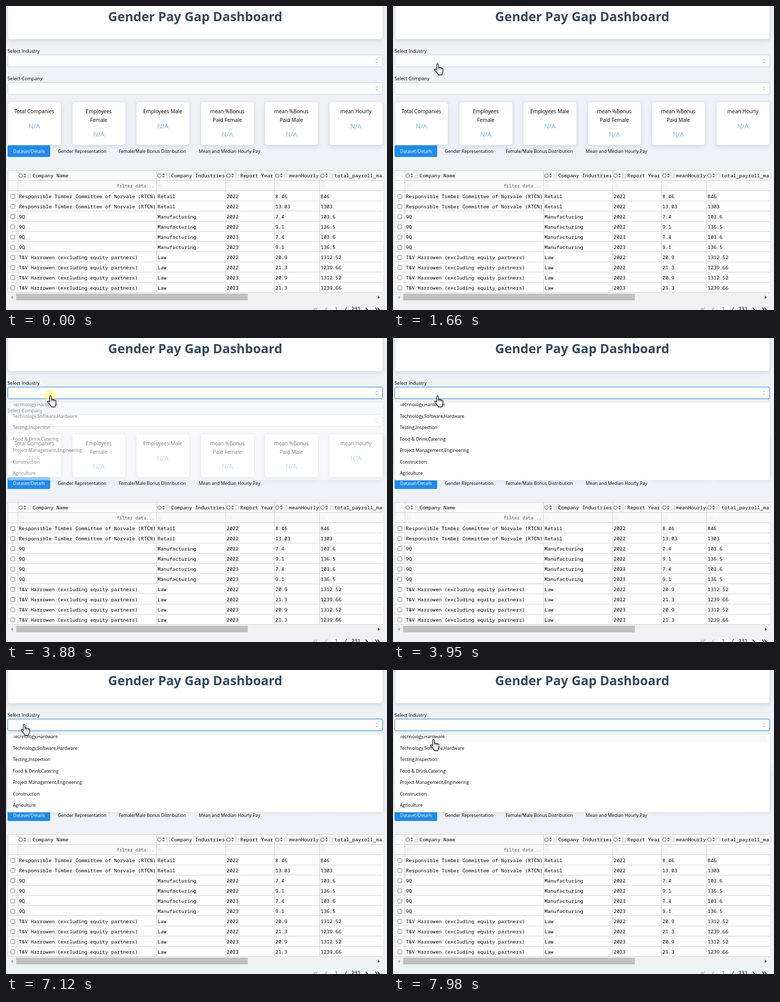
An HTML page that plays this animation: 750 by 598 pixels, repeating every 8 s.

```html
<!DOCTYPE html>
<html lang="en">
<head>
<meta charset="utf-8">
<title>Gender Pay Gap Dashboard</title>
<style>
  html, body { margin: 0; width: 100%; height: 100%; overflow: hidden; background: #eef2f6; }
  svg { display: block; width: 750px; height: 598px; }
  text { font-family: "Open Sans", "Noto Sans", sans-serif; white-space: pre; }
  .mono { font-family: "Noto Sans Mono", "DejaVu Sans Mono", monospace; }
  .card { fill: #fff; stroke: #dee2e6; filter: drop-shadow(0 3px 4px rgba(40, 60, 90, .12)); }
  .menu { fill: #fff; stroke: #f1f3f5; filter: drop-shadow(0 2px 4px rgba(40, 60, 90, .05)); }
</style>
</head>
<body>
<svg id="stage" viewBox="0 0 750 598"></svg>
<script>
const LOOP = 8000;
const stage = document.getElementById('stage');

function add(parent, tag, attrs, content) {
  const el = document.createElementNS('http://www.w3.org/2000/svg', tag);
  for (const k in attrs) el.setAttribute(k, attrs[k]);
  if (content !== undefined) el.textContent = content;
  parent.appendChild(el);
  return el;
}
const group = (parent = stage, attrs = {}) => add(parent, 'g', attrs);
const rect = (p, x, y, width, height, fill, more = {}) =>
  add(p, 'rect', { x, y, width, height, fill, ...more });
const path = (p, d, stroke, more = {}) => add(p, 'path', { d, stroke, fill: 'none', ...more });
const label = (p, x, y, str, size, more = {}) =>
  add(p, 'text', { x, y, 'font-size': size, fill: '#000', ...more }, str);
const mono = (p, x, y, str, size = 9.77, more = {}) =>
  label(p, x, y, str, size, { class: 'mono', ...more });

function card(x, y, w, h) {
  add(stage, 'rect', { x: x + .5, y: y + .5, width: w - 1, height: h - 1, rx: 5, class: 'card' });
}

function select(title, y) {
  label(stage, 3, y - 4, title, 9.2);
  const box = rect(stage, 3.5, y + .5, 738, 23, '#fff', { rx: 2.5, stroke: '#ced4da' });
  path(stage, `M728 ${y + 10.5}l2-2.3l2 2.3M728 ${y + 13.5}l2 2.3l2-2.3`, '#868e96', { 'stroke-width': .9 });
  return box;
}

function drawTop() {
  card(3, -20, 739, 86);
  label(stage, 372.5, 30, 'Gender Pay Gap Dashboard', 25.2,
    { 'font-weight': 700, 'text-anchor': 'middle', fill: '#34495e' });
}

function drawCards() {
  const titles = [['Total Companies'], ['Employees', 'Female'], ['Employees Male'],
    ['mean %Bonus', 'Paid Female'], ['mean %Bonus', 'Paid Male'], ['mean Hourly']];
  titles.forEach((lines, i) => {
    const x = Math.round(3 + i * 126.6), mid = x + 52.7;
    card(x, 188, 106, 86);
    lines.forEach((s, j) => label(stage, mid, 211 + 17 * j, s, 10.15, { 'text-anchor': 'middle' }));
    label(stage, mid, 224 + 16.5 * lines.length, 'N/A', 13.6,
      { 'text-anchor': 'middle', fill: '#3498db', 'font-weight': 300 });
  });
}

function drawTabs() {
  rect(stage, 3, 274, 84, 23, '#228be6', { rx: 2.5 });
  label(stage, 14, 289, 'Dataset/Details', 8.8, { fill: '#fff' });
  label(stage, 102, 289, 'Gender Representation', 8.8);
  label(stage, 222, 289, 'Female/Male Bonus Distribution', 8.8);
  label(stage, 379.5, 289, 'Mean and Median Hourly Pay', 8.8);
}

function headIcons(x) {
  add(stage, 'circle', { cx: x + 6, cy: 333.5, r: 3.6, fill: 'none', stroke: '#555', 'stroke-width': .9 });
  path(stage, `M${x + 11} 332.6h6l-3-3.6zM${x + 11} 334.4h6l-3 3.6z`, 'none', { fill: '#777' });
  path(stage, `M${x + 19.5} 330.5h7M${x + 22} 329.5h2M${x + 20.5} 331v7h5v-7M${x + 23} 332v5`, '#d6d2d2');
  path(stage, `M${x + 4} 350.5h8M${x + 4} 353.5h8M${x + 5} 350v7h6v-7`, '#f3ecec');
}

function drawTable() {
  const cols = [[23, 'Company Name'], [296, 'Company Industries'], [432, 'Report Year'],
    [528, 'meanHourly'], [617, 'total_payroll_ma']];
  const energy = ['Responsible Timber Committee of Norvale (RTCN)', 'Retail'];
  const maker = ['9Q', 'Manufacturing'];
  const law = ['T&V Harrowen (excluding equity partners)', 'Law'];
  const rows = [
    [...energy, 2022, '8.46', '846'], [...energy, 2022, '13.03', '1303'],
    [...maker, 2022, '7.4', '103.6'], [...maker, 2022, '9.1', '136.5'],
    [...maker, 2023, '7.4', '103.6'], [...maker, 2023, '9.1', '136.5'],
    [...law, 2022, '20.9', '1312.52'], [...law, 2022, '21.3', '1239.66'],
    [...law, 2023, '20.9', '1312.52'], [...law, 2023, '21.3', '1239.66']];

  rect(stage, 3, 323, 739, 41, '#fafafa');
  rect(stage, 3, 364, 739, 200, '#fff');
  let grid = '';
  for (let y = 323.5; y < 565; y += 20) grid += `M3 ${y}H742`;
  for (const x of [3, ...cols.map(c => c[0])]) grid += `M${x + .5} 323V564`;
  path(stage, grid, '#d3d3d3');

  for (const [x, name] of cols) {
    headIcons(x);
    mono(stage, x + 29.3, 337, name);
  }
  mono(stage, 217.8, 357, 'filter data...', 8.85, { fill: '#5c5457' });

  rows.forEach((row, i) => {
    const y = 378 + 20 * i;
    rect(stage, 9.5, y - 7.5, 8, 8, '#fff', { rx: 1.5, stroke: '#767676', 'stroke-width': .9 });
    row.forEach((v, j) => mono(stage, cols[j][0] + 2.3, y, v));
  });

  rect(stage, 3, 564, 739, 17, '#f1f1f1');
  rect(stage, 20, 566, 456, 13, '#c1c1c1');
  path(stage, 'M13.5 569.5v7l-4-3.5z', 'none', { fill: '#a3a3a3' });
  path(stage, 'M732 569.5v7l4-3.5z', 'none', { fill: '#505050' });
}

function drawPager() {
  const left = x => `M${x} 593.5l-3.5 3.5l3.5 3.5`;
  const right = x => `M${x} 593.5l3.5 3.5l-3.5 3.5`;
  path(stage, left(609.5) + left(613.5) + left(632), '#a5a8ab', { 'stroke-width': 1.3 });
  path(stage, right(708) + right(727) + right(731), '#222', { 'stroke-width': 1.5 });
  rect(stage, 640, 589, 20, 9, '#fff');
  mono(stage, 647, 600, '1', 10, { fill: '#1f5f9a' });
  mono(stage, 666, 600, '/', 10);
  mono(stage, 680, 600, '231', 10);
}

function drawMenu() {
  const g = group();
  add(g, 'rect', { x: 3.5, y: 126.5, width: 738, height: 153, rx: 2.5, class: 'menu' });
  const clip = add(stage, 'clipPath', { id: 'list' });
  rect(clip, 4, 129, 737, 147, '#000');
  const list = group(g, { 'clip-path': 'url(#list)' });
  const hover = rect(list, 9, 120, 727, 22, '#f8f9fa', { rx: 2.5 });
  ['Technology,Hardware', 'Technology,Software,Hardware', 'Testing,Inspection', 'Food & Drink,Catering',
    'Project Management,Engineering', 'Construction', 'Agriculture']
    .forEach((s, i) => label(list, 13.5, 134.2 + 22.5 * i, s, 8.8));
  return { g, hover };
}

drawTop();
const industry = select('Select Industry', 96);
select('Select Company', 150);
drawCards();
drawTabs();
drawTable();
drawPager();
const menu = drawMenu();
const halo = add(stage, 'circle', { cx: 87.5, cy: 114, r: 12.3, fill: '#ffff3c' });

const cursor = group();
const pointers = { arrow: group(cursor), beam: group(cursor), hand: group(cursor) };
path(pointers.arrow, 'M.5 .5V16.5L4.3 12.9L6.8 18.6L9.2 17.5L6.7 11.9H11.8Z', '#000', { fill: '#fff' });
path(pointers.beam, 'M-3 -7.5h2l1 1l1-1h2M0-6.5V6.5M-3 7.5h2l1-1l1 1h2', '#000');
path(pointers.hand, 'M-2 13.2V2.3a1.7 1.7 0 0 1 3.4 0V8.2q1.6-1.1 3.1.3q1.7-.8 2.9.7q2.6-.5 2.9 2V15.8' +
  'q0 2.2-1.6 4.2V22.7H.8V20.6Q-1.2 18.2-5.9 13.1q-.7-2 1.2-2.1Q-3.2 11.5-2 13.2Z',
  '#000', { fill: '#fff', 'stroke-width': 1.2, 'stroke-linejoin': 'round' });
path(pointers.hand, 'M1.4 8.3v3.2M4.5 8.8v3M7.4 9.4v2.8', '#000');

const smooth = p => p * p * (3 - 2 * p);
const out = p => 1 - (1 - p) ** 1.6;

// first step, last step, steps, end point, easing of x and y
const moves = [
  [640, 790, 6, 320, 430, out, out],
  [1020, 1180, 6, 118, 198, smooth, smooth],
  [1440, 1660, 7, 88, 113, out, out],
  [6830, 6830, 1, 86, 113, out, out],
  [6900, 7120, 7, 36, 106, out, smooth],
  [7420, 7420, 1, 35, 106, out, out],
  [7650, 7980, 12, 80, 136, p => p ** .82, p => p ** 2.1]
];

// stepped progress: 1/n at the first step, 1 at the last
function progress(t, t0, t1, n) {
  if (t < t0) return 0;
  if (t >= t1) return 1;
  return (Math.floor((t - t0) / (t1 - t0) * (n - 1) + 1e-6) + 1) / n;
}

function pointerAt(t) {
  let x = 765, y = 629;
  for (const [t0, t1, n, toX, toY, ex, ey] of moves) {
    const p = progress(t, t0, t1, n);
    x += (toX - x) * ex(p);
    y += (toY - y) * ey(p);
  }
  return [Math.round(x), Math.round(y)];
}

function shapeAt(y, open) {
  if (open || (y >= 96 && y < 120) || (y >= 150 && y < 174)) return 'hand';
  return y > 323 && y < 564 ? 'beam' : 'arrow';
}

const show = (el, on) => el.setAttribute('visibility', on ? 'inherit' : 'hidden');

function render(t) {
  const click = progress(t, 3780, 3950, 5);
  const open = Math.max(0, (click * 5 - 1) / 4);
  const [x, y] = pointerAt(t);
  const shape = shapeAt(y, open > 0);

  industry.setAttribute('stroke', open ? '#2684c6' : '#ced4da');
  menu.g.setAttribute('opacity', open);
  show(menu.g, open > 0);
  show(menu.hover, open > 0 && y >= 129);
  halo.setAttribute('opacity', click ? .8 * (1 - open) : 0);

  show(cursor, t >= 640);
  cursor.setAttribute('transform', `translate(${x} ${y})`);
  for (const k in pointers) pointers[k].setAttribute('display', k === shape ? 'inline' : 'none');
}

const start = performance.now();
function tick() {
  render((performance.now() - start) % LOOP);
  requestAnimationFrame(tick);
}
tick();
</script>
</body>
</html>
```
